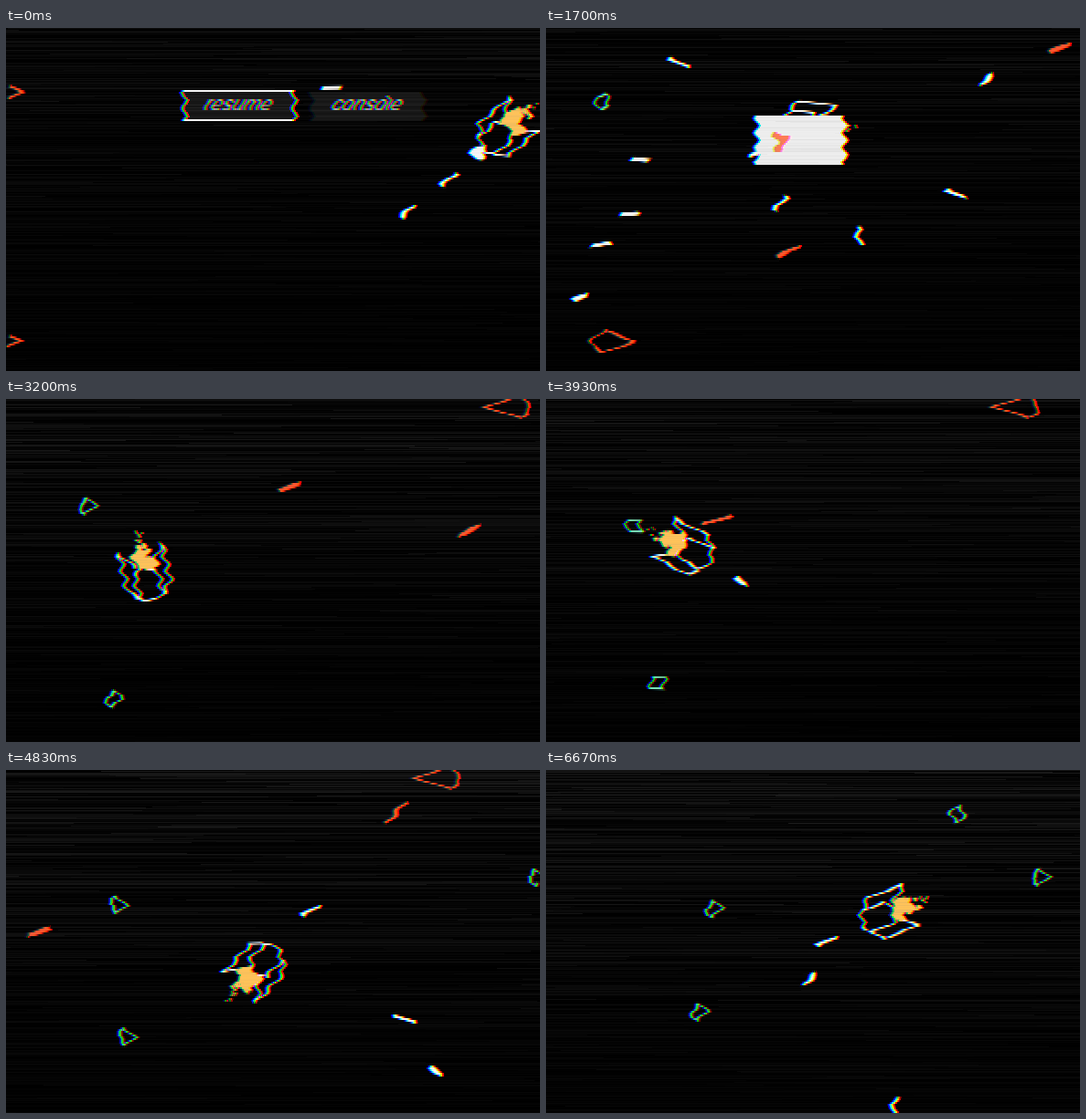
Animation of 584 by 376 pixels, one loop 6710 ms. Source, as an HTML page with a canvas:

```html
<!DOCTYPE html>
<html lang="en">
<head>
<meta charset="utf-8">
<title>Vector shooter</title>
<style>
html, body { margin: 0; width: 100%; height: 100%; overflow: hidden; background: #000; }
canvas { display: block; width: 584px; height: 376px; }
</style>
</head>
<body>
<canvas id="screen" width="584" height="376"></canvas>
<script>
const W = 584, H = 376, LOOP = 6710, STEP = 100 / 3;
const SHOT_SPEED = 0.315, FOE_SPEED = 0.047, FOE_SHOT_SPEED = 0.175;
const WHITE = '#f8f8f8', RED = '#ff5530', FLAME = '#ffc35a', GEM = '#78e0b8';
const screen2d = document.getElementById('screen').getContext('2d');
const scene = document.createElement('canvas');
scene.width = W;
scene.height = H;
const g = scene.getContext('2d', { willReadFrequently: true });
const out = screen2d.createImageData(W, H);

// Flight plan: time, x, y, heading
const flight = [[-800, 632, 60, 179], [-350, 545, 112, 139.5], [0, 538, 118, 139.5],
  [870, 413, 175, 174], [1700, 280, 104, 546], [2530, 182, 218, 481], [3930, 161, 168, 387],
  [4830, 281, 210, 313], [5700, 430, 128, 440], [6670, 365, 160, 520]];

// Bursts: first shot, count, gap
const bursts = [[-800, 1, 0], [-320, 3, 155], [560, 3, 155], [950, 10, 75],
  [2190, 2, 155], [3815, 2, 280], [4620, 1, 0], [6000, 1, 0], [6360, 3, 155]];

// Each foe flies straight, shoots at the ship and leaves a drifting gem
const foes = [
  { x: -5, y: 70, dir: 1, dies: 900, fires: [400], stop: 1690, drift: [[2530, 83, 94], [3930, 96, 139], [6670, 183, 152]] },
  { x: -8, y: 343, dir: 1, dies: 2580, fires: [250], stop: 4000, drift: [[4830, 131, 292], [6670, 167, 265]] },
  { x: 699, y: 8, dir: -1, dies: 5350, fires: [1430, 4540], stop: 5500, drift: [[6670, 450, 48]] }
];
const strayGem = [[3000, 620, 118], [6670, 540, 117]];

const rad = d => d * Math.PI / 180;

function hash(a, b) {
  const s = Math.sin(a * 127.1 + b * 311.7) * 43758.5453;
  return s - Math.floor(s);
}

function segment(keys, t) {
  let i = 0;
  while (i < keys.length - 2 && t >= keys[i + 1][0]) i++;
  const u = (t - keys[i][0]) / (keys[i + 1][0] - keys[i][0]);
  return [i, Math.max(0, Math.min(1, u))];
}

// Smooth curve through x, y of the keys
function place(keys, t) {
  const [i, u] = segment(keys, t), a = keys[i], b = keys[i + 1], dt = b[0] - a[0];
  const slope = (j, c) => {
    const p = keys[Math.max(j - 1, 0)], q = keys[Math.min(j + 1, keys.length - 1)];
    return (q[c] - p[c]) / (q[0] - p[0]) * dt;
  };
  const u2 = u * u, u3 = u2 * u, ease = 3 * u2 - 2 * u3;
  return [1, 2].map(c => a[c] + (b[c] - a[c]) * ease
    + slope(i, c) * (u3 - 2 * u2 + u) + slope(i + 1, c) * (u3 - u2));
}

function heading(t) {
  const [i, u] = segment(flight, t), a = flight[i][3], b = flight[i + 1][3];
  return rad(a + (b - a) * u * u * (3 - 2 * u));
}

const foeX = (foe, t) => foe.x + foe.dir * FOE_SPEED * t;

// A shot leaves the nose and keeps part of the ship's speed
function makeShot(born) {
  const [x, y] = place(flight, born), [px, py] = place(flight, born - 10);
  const a = heading(born), c = Math.cos(a), s = Math.sin(a);
  return {
    born, x: x + 25 * c, y: y + 25 * s,
    vx: SHOT_SPEED * c + 0.03 * (x - px), vy: SHOT_SPEED * s + 0.03 * (y - py)
  };
}

function makeFoeShot(foe, born) {
  const [sx, sy] = place(flight, born + 250), x = foeX(foe, born) + 25 * foe.dir;
  const a = Math.atan2(sy - foe.y, sx - x);
  return { born, x, y: foe.y, vx: FOE_SHOT_SPEED * Math.cos(a), vy: FOE_SHOT_SPEED * Math.sin(a), stop: foe.stop };
}

const shots = bursts.flatMap(([first, count, gap]) =>
  Array.from({ length: count }, (_, i) => makeShot(first + i * gap)));
const foeShots = foes.flatMap(foe => foe.fires.map(born => makeFoeShot(foe, born)));
const gems = foes.map(f => [[f.dies, foeX(f, f.dies), f.y], ...f.drift]).concat([strayGem]);

function path(points, closed) {
  g.beginPath();
  points.forEach(p => g.lineTo(p[0], p[1]));
  if (closed) g.closePath();
}

function outline(points, color, closed = true) {
  path(points, closed);
  g.strokeStyle = color;
  g.lineWidth = 2;
  g.stroke();
}

function dot(x, y, r, color) {
  g.fillStyle = color;
  g.beginPath();
  g.arc(x, y, r, 0, 7);
  g.fill();
}

function placed(x, y, angle, draw) {
  g.save();
  g.translate(x, y);
  g.rotate(angle);
  draw();
  g.restore();
}

function drawShip(t, k) {
  const [x, y] = place(flight, t);
  placed(x, y, heading(t), () => {
    outline([[20, -6], [14, -13], [-10, -13], [-17, 0], [-10, 13], [14, 13], [20, 6]], WHITE);
    for (const s of [-1, 1])
      outline([[16, 13 * s], [5, 24 * s], [-37, 24 * s], [-18, 10 * s]], WHITE, false);
    for (let i = 0; i < 30; i++) {
      const d = hash(k, i) ** 1.5;
      dot(-19 - 40 * d, (hash(i, k + 50) - 0.5) * 20 * (1 - d * 0.7), 1 + 6 * (1 - d) ** 2, FLAME);
    }
  });
}

function drawShot(s, t, color, size) {
  const age = t - s.born;
  if (age < 0 || t > s.stop) return;
  placed(s.x + s.vx * age, s.y + s.vy * age, Math.atan2(s.vy, s.vx), () => {
    if (color === WHITE && age < STEP) dot(0, 0, 8, color);
    const len = Math.min(size, 3 + age * 0.1 + size * 0.2);
    g.fillStyle = color;
    g.fillRect(-len / 2, -2, len, 4);
  });
}

function drawFoe(foe, t) {
  if (t >= foe.dies) return;
  const x = foeX(foe, t);
  const shape = [[25, 0], [-10, -12], [-25, 1], [-21, 7], [-11, 12]];
  outline(shape.map(p => [x + p[0] * foe.dir, foe.y + p[1]]), RED);
}

function drawGem(keys, t) {
  if (t < keys[0][0]) return;
  const [x, y] = place(keys, t);
  placed(x, y, (t - 3930) / 900 * Math.PI / 4, () =>
    outline([[-7, -6], [7, -6], [7, 6], [-7, 6]], GEM));
}

function drawMenu() {
  g.fillStyle = '#141414';
  g.fillRect(334, 69, 123, 32);
  g.fillRect(195, 68, 120, 32);
  g.strokeStyle = WHITE;
  g.lineWidth = 2;
  g.strokeRect(195, 68, 120, 32);
  g.font = '22px "Liberation Sans", Arial, sans-serif';
  g.textAlign = 'center';
  g.textBaseline = 'middle';
  g.fillStyle = '#d0d0d0';
  g.fillText('resume', 254, 84);
  g.fillText('console', 395, 84);
}

function drawHit() {
  g.fillStyle = '#eeeeee';
  g.fillRect(230, 95, 97, 54);
  path([[247, 119], [254, 113], [260, 117], [269, 117], [262, 123],
    [262, 132], [256, 136], [250, 135], [256, 126]], true);
  g.fillStyle = '#ff7c55';
  g.fill();
}

// Row wobble, colour split and faint line noise
function postProcess(k) {
  const src = g.getImageData(0, 0, W, H).data, dst = out.data;
  const level = 18 + 14 * hash(k, 7);
  for (let y = 0; y < H; y++) {
    const row = y & ~1;
    const shift = Math.round(2.7 * Math.sin(row * 0.39 + 2.2 + k * 0.9));
    const fade = level * (1 - y / 480);
    const left = fade * hash(y, k) ** 2, right = fade * hash(y + 400, k) ** 2;
    const cut = W * hash(y + 800, k);
    for (let x = 0; x < W; x++) {
      const o = (y * W + x) * 4, noise = x < cut ? left : right;
      for (let c = 0; c < 3; c++) {
        const sx = x - shift - (2 - 2 * c);
        const v = sx >= 0 && sx < W ? src[(row * W + sx) * 4 + c] : 0;
        dst[o + c] = v + noise * (1 - v / 128);
      }
      dst[o + 3] = 255;
    }
  }
  screen2d.putImageData(out, 0, 0);
}

function render(k) {
  const t = k * STEP + 3;
  g.fillStyle = '#000';
  g.fillRect(0, 0, W, H);
  if (t < 200) drawMenu();
  foes.forEach(f => drawFoe(f, t));
  gems.forEach(keys => drawGem(keys, t));
  foeShots.forEach(s => drawShot(s, t, RED, 30));
  shots.forEach(s => drawShot(s, t, WHITE, 21));
  drawShip(t, k);
  if (t > 1660 && t < 1780) drawHit();
  postProcess(k);
}

let shown = -1;
function tick() {
  const t = performance.now() % LOOP;
  const k = Math.min(200, Math.floor((t + 3.4) / STEP));
  if (k !== shown) render(shown = k);
  requestAnimationFrame(tick);
}
tick();
</script>
</body>
</html>
```
